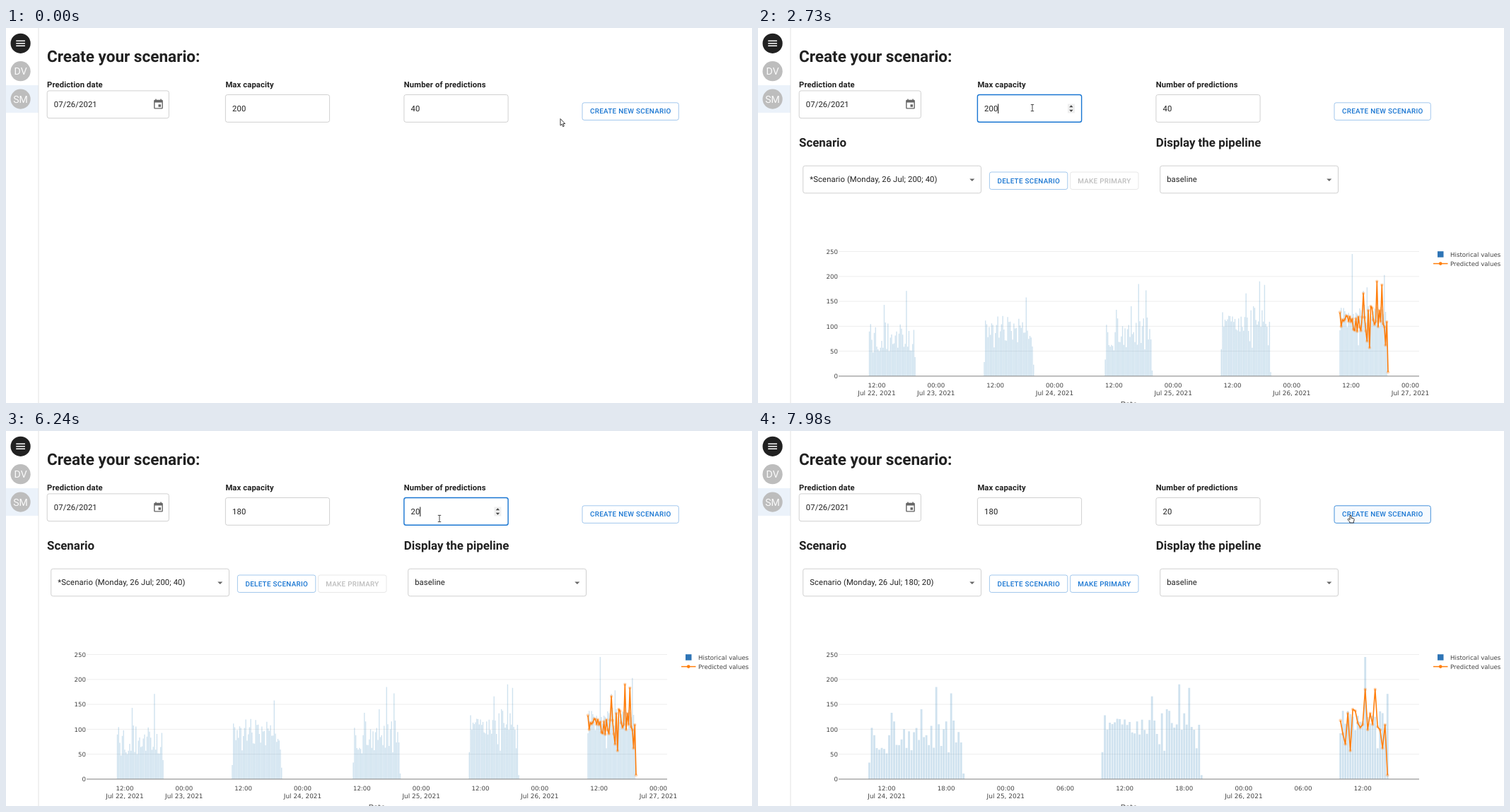
Animation of 1055 by 531 pixels, one loop 8 s. Source, as an HTML page:

```html
<!DOCTYPE html>
<html lang="en">
<head>
<meta charset="utf-8">
<title>Create your scenario</title>
<style>
  html, body { margin: 0; width: 100%; height: 100%; overflow: hidden; background: #fff; }
  svg { display: block; width: 1055px; height: 531px; }
  text { font-family: Roboto, sans-serif; font-size: 11.28px; fill: #212121; white-space: pre; text-rendering: geometricPrecision; }
  .body { letter-spacing: .00938em; }
  .bold { font-weight: 700; letter-spacing: .00938em; }
  .h1 { font-weight: 700; font-size: 22.56px; }
  .h2 { font-weight: 700; font-size: 16.92px; }
  .btn { font-weight: 500; font-size: 9.87px; letter-spacing: .02857em; fill: #1976d2; text-anchor: middle; }
  .avatar { font-size: 14.1px; fill: #fafafa; text-anchor: middle; }
  .axis { font-family: "DejaVu Sans", sans-serif; font-size: 8.65px; fill: #444; }
  .box { fill: none; stroke: #c4c4c4; stroke-width: .8; }
</style>
</head>
<body>
<svg id="stage" viewBox="0 0 1055 531"></svg>
<script>
const NS = "http://www.w3.org/2000/svg";
const stage = document.getElementById("stage");
const LOOP = 8000, BLUE = "#1976d2", ORANGE = "#ff7f0e", PX = 0.705;

function set(el, attrs) {
  for (const k in attrs) el.setAttribute(k, attrs[k]);
}
function add(parent, tag, attrs = {}, content) {
  const el = document.createElementNS(NS, tag);
  set(el, attrs);
  if (content !== undefined) el.textContent = content;
  return parent.appendChild(el);
}
const label = (p, x, y, s, cls, more) => add(p, "text", { x, y, class: cls, ...more }, s);
const frame = (p, x, y, width, height, more) =>
  add(p, "rect", { x, y, width, height, rx: 2.8, class: "box", ...more });
const icon = (p, cx, cy, d, fill) =>
  add(p, "path", { d, fill, transform: `translate(${cx - 12 * PX} ${cy - 12 * PX}) scale(${PX})` });
const show = (el, on) => el.setAttribute("visibility", on ? "inherit" : "hidden");

const clamp = v => Math.min(1, Math.max(0, v));
const smooth = v => v * v * (3 - 2 * v);
const ramp = (t, start, span) => smooth(clamp((t - start) / span));

// Sidebar
add(stage, "rect", { x: 0, y: 81, width: 46, height: 39, fill: "#ebf2fa" });
add(stage, "rect", { x: 45.6, y: 0, width: 0.8, height: 531, fill: "#dcdcdc" });
add(stage, "circle", { cx: 20.6, cy: 21.8, r: 14.1, fill: "#212121" });
icon(stage, 20.6, 21.8, "M3 18h18v-2H3zM3 13h18v-2H3zM3 6v2h18V6z", "#fff");
["DV", "SM"].forEach((s, i) => {
  const y = 61.2 + 39.4 * i;
  add(stage, "circle", { cx: 20.6, cy: y, r: 14.1, fill: "#bdbdbd" });
  label(stage, 20.6, y + 5.1, s, "avatar");
});

// Form
label(stage, 58, 47.8, "Create your scenario:", "h1");
label(stage, 58, 84, "Prediction date", "bold");
label(stage, 310.4, 84, "Max capacity", "bold");
label(stage, 562.8, 84, "Number of predictions", "bold");
frame(stage, 58.2, 88.9, 172.2, 38.8);
label(stage, 67.8, 112.3, "07/26/2021", "body");
icon(stage, 215.5, 108.2, "M17 12h-5v5h5zM16 1v2H8V1H6v2H5a2 2 0 0 0-2 2v14a2 2 0 0 0 2 2h14a2 2 0 0 0 2-2V5a2 2 0 0 0-2-2h-1V1zM19 19H5V8h14z", "#666");

function makeField(x) {
  const g = add(stage, "g"), c = x + 132.5;
  const box = frame(g, x, 94.5, 147.2, 38.8);
  const mark = add(g, "rect", { x: x + 9.7, y: 107.5, height: 13.5, fill: "#0078d7" });
  const text = label(g, x + 9.7, 118, "", "body");
  const caret = add(g, "rect", { y: 107.5, width: 1, height: 13.5, fill: "#111" });
  const spin = add(g, "g");
  add(spin, "rect", { x: c - 5, y: 107.5, width: 10, height: 13, fill: "#efefef" });
  add(spin, "path", { d: `M${c - 2.7} 112.3h5.4l-2.7-3zM${c - 2.7} 115.7h5.4l-2.7 3z`, fill: "#444" });
  return { x, box, mark, text, caret, spin };
}
const capacity = makeField(310.4), count = makeField(562.9);

function drawField(f, value, focus, hover, picked) {
  f.text.textContent = value;
  f.text.style.fill = picked ? "#fff" : "";
  set(f.mark, { width: picked * 6.44 });
  show(f.caret, focus && !picked);
  set(f.caret, { x: f.x + 9.5 + value.length * 6.44 });
  show(f.spin, focus || hover);
  f.box.style.stroke = focus ? BLUE : hover ? "#212121" : "";
  f.box.style.strokeWidth = focus ? 1.41 : "";
}

// Create button with its ripple
const createBox = frame(stage, 815, 105.8, 136.3, 24.6);
add(add(stage, "clipPath", { id: "face" }), "rect", { x: 815.4, y: 106.2, width: 135.5, height: 23.8, rx: 2.5 });
const ripple = add(add(stage, "g", { "clip-path": "url(#face)" }), "circle", { fill: BLUE });
label(stage, 883.3, 121.4, "CREATE NEW SCENARIO", "btn");

// Results
const results = add(stage, "g");
label(results, 58, 168.3, "Scenario", "h2");
label(results, 562.8, 168.3, "Display the pipeline", "h2");
[63.7, 568.7].forEach(x => {
  frame(results, x, 195.2, 251.8, 38.6);
  icon(results, x + 239.1, 215, "M7 10l5 5 5-5z", "#666");
});
const chosen = label(results, 73.3, 218.4, "", "body");
label(results, 578.2, 218.4, "baseline", "body");
frame(results, 327.4, 204, 110.4, 24.5, { style: "stroke:#8cbae8" });
label(results, 382.8, 219.7, "DELETE SCENARIO", "btn");
const primaryBox = frame(results, 441.6, 204, 96.4, 24.5);
const primaryText = label(results, 489.9, 219.7, "MAKE PRIMARY", "btn");

// Quarter-hour counts of one day: seeded noise with a few fixed peaks
function makeDay(start, n, low, high, seed, peaks) {
  const values = Array.from({ length: n }, (_, i) => {
    seed = (seed * 16807) % 2147483647;
    return peaks[i] || low + (high - low) * seed / 2147483647;
  });
  return { start, values };
}
const sunday = makeDay(81.75, 41, 88, 121, 40961,
  { 0: 54, 1: 128, 20: 166, 23: 70, 24: 132, 25: 57, 26: 140, 27: 137, 31: 190, 33: 132, 35: 183, 38: 62, 40: 8 });
const days = [
  makeDay(10.5, 38, 45, 108, 90217, { 12: 143, 30: 171, 37: 38 }),
  makeDay(33.75, 41, 55, 122, 51733, { 0: 28, 34: 158, 40: 23 }),
  makeDay(58.25, 39, 50, 120, 73019, { 0: 33, 9: 133, 21: 140, 27: 185, 33: 172, 38: 11 }),
  sunday,
  makeDay(105.75, 39, 90, 145, 4127, { 10: 245, 15: 62, 19: 171, 22: 178, 36: 203 })
];
const yOf = v => 492.9 - v * 0.7056;

// Hours count from the start of Jul 22; h0 sits at x0
function makeChart(x0, h0, perHour, every, lastTick, steps, cap) {
  const g = add(results, "g");
  const xOf = h => x0 + (h - h0) * perHour;
  const from = 105.75, to = from + (steps - 1) / 4, w = perHour * 0.2;

  for (let v = 0; v <= 250; v += 50) {
    if (v) add(g, "rect", { x: 114, y: yOf(v) - 0.5, width: 821, height: 1, fill: "#eee" });
    label(g, 113, yOf(v) + 3.2, v, "axis", { "text-anchor": "end" });
  }

  let bars = "";
  days.forEach(day => day.values.forEach((v, i) => {
    const h = day.start + i / 4;
    if (h >= h0 - 2 && h <= to)
      bars += `M${(xOf(h) - w / 2).toFixed(2)} 492.9V${yOf(v).toFixed(1)}h${w.toFixed(2)}V492.9z`;
  }));
  add(g, "path", { d: bars, fill: "#1f77b4", "fill-opacity": 0.21 });
  add(g, "rect", { x: 114, y: 492.4, width: 821, height: 1.1, fill: "#8c8c8c" });

  // The baseline forecast repeats the day before, cut at the capacity
  const pts = sunday.values.slice(-steps).map((v, i) => [xOf(from + i / 4), yOf(Math.min(v, cap))]);
  pts.forEach(([cx, cy]) => add(g, "circle", { cx, cy, r: 2.3, fill: ORANGE, "fill-opacity": 0.3 }));
  add(g, "polyline", { points: pts.join(" "), fill: "none", stroke: ORANGE, "stroke-width": 1.6, "stroke-linejoin": "round" });

  const mid = { "text-anchor": "middle" };
  for (let h = h0; h <= lastTick; h += every) {
    const hour = h % 24;
    label(g, xOf(h), 508.8, String(hour).padStart(2, "0") + ":00", "axis", mid);
    if (h === h0 || hour === 0)
      label(g, xOf(h), 520.2, `Jul ${22 + Math.floor(h / 24)}, 2021`, "axis", { ...mid, style: "font-size:8.95px" });
  }
  return g;
}
const wide = makeChart(168, 12, 6.986, 12, 120, 40, 200);
const close = makeChart(182, 60, 14.025, 6, 108, 20, 180);
label(results, 524.5, 535.6, "Date", "axis", { "text-anchor": "middle", style: "font-size:9.9px" });
add(results, "rect", { x: 961, y: 316.2, width: 8.5, height: 8.5, fill: "#2e75b6" });
label(results, 979, 323.6, "Historical values", "axis");
add(results, "path", { d: "M955 333.6h20.5", stroke: ORANGE, "stroke-width": 1.5 });
add(results, "circle", { cx: 965.2, cy: 333.6, r: 2.3, fill: ORANGE });
label(results, 979, 337, "Predicted values", "axis");

// Pointer shapes, hot spot at 0,0
const outline = { fill: "#fff", stroke: "#222", "stroke-width": 0.9, "stroke-linejoin": "round" };
const pointers = {
  arrow: add(stage, "path", { d: "M0 0V9.6L2.2 7.6 3.7 11.2 5.3 10.5 3.8 7H6.7z", ...outline }),
  beam: add(stage, "path", { d: "M-2.2-4.6H2.2M0-4.6V4.6M-2.2 4.6H2.2", stroke: "#333", "stroke-width": 0.9 }),
  hand: add(stage, "path", { d: "M-1 .8Q0-.6 1 .8V4.2L4.4 5Q5.4 5.4 5.2 6.8L4.4 9.4V11H-1.2V9.6L-3.8 6.6Q-4.2 5.2-2.6 5.4L-1 6.6z", ...outline })
};

// Pointer moves: start, end, x, y; it rests in between
const moves = [
  [130, 900, 839, 122], [1860, 2660, 388, 113], [2730, 3370, 283, 108], [3370, 3710, 311, 105.8],
  [3910, 4680, 538, 112], [4750, 5160, 606, 115], [5700, 5840, 571, 114], [6000, 6240, 613, 124],
  [6240, 6450, 714, 119], [6520, 7130, 846, 117.5], [7430, 7980, 838, 119]
];
function pointerAt(t) {
  let x = 784, y = 128.5;
  for (const [start, end, toX, toY] of moves) {
    const p = ramp(t, start, end - start);
    x += (toX - x) * p;
    y += (toY - y) * p;
  }
  return [x, y];
}
const inside = (x, y, l, top, w, h) => x >= l && x <= l + w && y >= top && y <= top + h;
const picked = (f, x, n) => Math.min(n, Math.max(0, Math.round(n - (x - f.x - 9.7) / 6.44)));

// Presses: time, x, y, radius
const presses = [[920, 839, 124, 114], [7130, 846, 122, 98]];
function drawRipple(t) {
  const hit = presses.find(p => t >= p[0] && t < p[0] + 600);
  show(ripple, hit);
  if (!hit) return;
  const [start, cx, cy, full] = hit;
  const grow = 1 - Math.pow(1 - clamp((t - start) / 550), 3.3);
  const left = 1 - clamp((t - start - 40) / 560);
  set(ripple, { cx, cy, r: full * grow, "fill-opacity": 0.3 * left * left });
}

function draw(t) {
  const [x, y] = pointerAt(t);
  const over = f => inside(x, y, f.x, 94.5, 147.2, 38.8);
  const onButton = inside(x, y, 815, 105, 136.3, 25.4);
  const dragging = t >= 2730 && t < 3800;
  const kind = onButton ? "hand" : dragging || over(capacity) || over(count) ? "beam" : "arrow";
  for (const k in pointers) show(pointers[k], k === kind);
  set(pointers[kind], { transform: `translate(${x.toFixed(2)} ${y.toFixed(2)})` });

  const pick1 = t < 2730 || t >= 3710 ? 0 : t < 3370 ? picked(capacity, x, 3) : 3;
  const pick2 = t < 5700 || t >= 5980 ? 0 : picked(count, x, 2);
  const value1 = t < 3710 ? "200" : t < 3910 ? "1" : t < 4050 ? "18" : "180";
  const value2 = t < 5980 ? "40" : t < 6110 ? "2" : "20";
  drawField(capacity, value1, t >= 2660 && t < 5300, over(capacity), pick1);
  drawField(count, value2, t >= 5300 && t < 7130, over(count), pick2);

  const hover = ramp(t, 540, 250) - ramp(t, 1970, 250) + ramp(t, 6930, 250);
  createBox.style.fill = `rgba(25,118,210,${0.04 * hover})`;
  createBox.style.stroke = `rgba(25,118,210,${0.5 + 0.5 * hover})`;
  drawRipple(t);

  show(results, t >= 1720);
  show(wide, t < 7710);
  show(close, t >= 7710);
  chosen.textContent = t < 7360 ? "*Scenario (Monday, 26 Jul; 200; 40)"
    : t < 7570 ? "" : "Scenario (Monday, 26 Jul; 180; 20)";
  const p = ramp(t, 7300, 250);
  const tint = a => `rgba(${25 * p},${118 * p},${210 * p},${a})`;
  primaryText.style.fill = tint(0.26 + 0.74 * p);
  primaryBox.style.stroke = tint(0.12 + 0.38 * p);
}

const begin = performance.now();
function tick() {
  draw((performance.now() - begin) % LOOP);
  requestAnimationFrame(tick);
}
tick();
</script>
</body>
</html>
```
